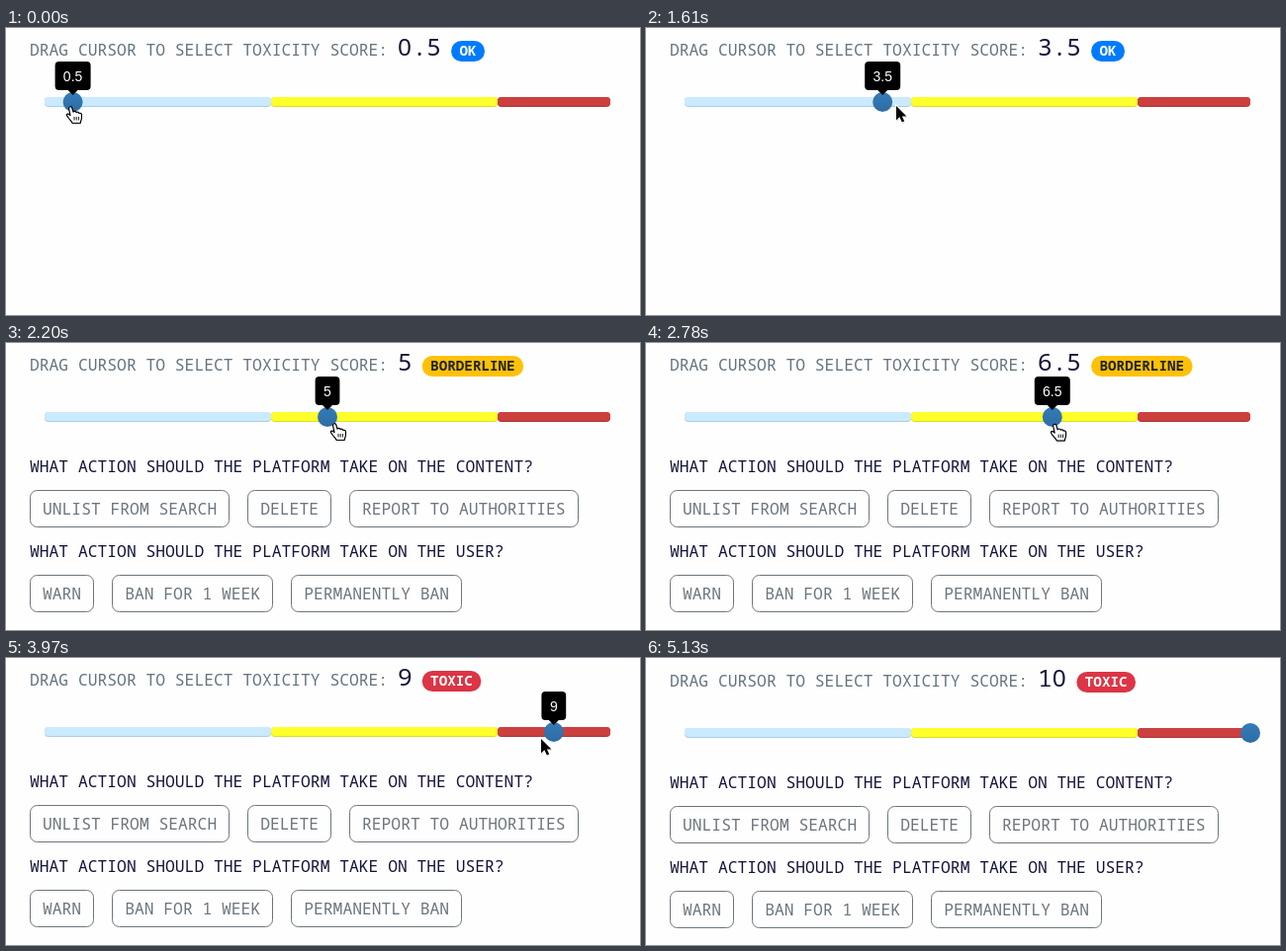
Write an HTML page that moves like this. It is 641 px wide and 291 px high and loops after 5.43 s.

```html
<!DOCTYPE html>
<html lang="en">
<head>
<meta charset="utf-8">
<title>Toxicity score slider</title>
<style>
html, body { margin: 0; width: 100%; height: 100%; overflow: hidden; background: #fefefe; }
svg { display: block; }
text { font: 16.32px "Noto Sans Mono", "DejaVu Sans Mono", monospace; white-space: pre; }
.label { fill: #64747f; }
.head { fill: #14143a; }
.button text { fill: #6c757d; }
.button rect { fill: none; stroke: #6c757d; }
#score { font-size: 24.48px; fill: #14143a; }
.zero { font-family: "Noto Sans", "Open Sans", sans-serif; letter-spacing: .68px; }
#pill text { font-size: 14.28px; font-weight: 700; }
#tip text { font: 14px "Liberation Sans", Arial, sans-serif; fill: #fff; text-anchor: middle; }
</style>
</head>
<body>
<svg width="641" height="291" viewBox="0 0 641 291">
  <defs>
    <linearGradient id="knobFill" x2="0" y2="1">
      <stop offset="0" stop-color="#347bb8"/>
      <stop offset="1" stop-color="#2e6da4"/>
    </linearGradient>
  </defs>
  <g id="page">
    <text class="label" x="24" y="28">DRAG CURSOR TO SELECT TOXICITY SCORE:</text>
    <text id="score" x="396" y="28"></text>
    <g id="pill">
      <rect y="13" height="21" rx="10.5"/>
      <text x="8.4" y="28.3"></text>
    </g>
    <g id="track"></g>
    <g id="panel"></g>
    <circle id="knob" cy="75" r="10" fill="url(#knobFill)"/>
    <g id="tip">
      <rect y="34" height="29" rx="4"/>
      <path d="M-5 63H5L0 68Z"/>
      <text y="54"></text>
    </g>
  </g>
  <g id="cursor">
    <g id="hand" fill="#fff" stroke="#000" stroke-width="1.2" stroke-linejoin="round">
      <path d="M-2.5 1.5C-2.5-.5 .2-1 .8 1L2 5.2C3 4 4.6 4.2 5 5.6C6 4.8 7.4 5.2 7.8 6.5C9.2 5.8 10.5 6.8 10.5 8.5L10.4 11.5C10.4 13 9.4 14 9.2 16.5H1.2C.5 14.8-1 13.5-3 11C-4.2 9.5-5 8.6-4.6 7.6C-4 6.6-2.4 7-1 8.6Z"/>
      <path d="M3 10v3.5M5.2 10v3.5M7.4 10v3.5" stroke-width=".9"/>
    </g>
    <g id="arrow">
      <path d="M.5 1.5V16L3.9 12.8L6.3 18L8.7 17L6.4 11.9H11Z" fill="#000" opacity=".2"/>
      <path d="M0 0V14.5L3.4 11.3L5.8 16.6L8.2 15.5L5.9 10.4H10.5Z" stroke="#fff" stroke-width="2" paint-order="stroke"/>
    </g>
  </g>
</svg>
<script>
const LOOP = 5430, STEP = 146.8;
const LEFT = 39, HALF = 28.6;      // slider start, width of half a point
const CHAR = 9.792, BIG = 14.69, SMALL = 8.57;

// cursor path: step, x, y
const PATH = [
  [0, 66, 80], [6, 160, 82], [11, 253, 79], [15, 333, 82], [22, 475, 83],
  [27, 541, 82], [28, 560, 83], [30, 606, 85], [32, 609, 178]
];
const LEVELS = [
  { from: 8, name: "TOXIC", back: "#dc3545", ink: "#fff" },
  { from: 4, name: "BORDERLINE", back: "#ffc107", ink: "#212529" },
  { from: 0, name: "OK", back: "#007bff", ink: "#fff" }
];

const $ = q => document.querySelector(q);
const show = (el, on) => el.setAttribute("visibility", on ? "visible" : "hidden");
const move = (el, x, y = 0) => el.setAttribute("transform", `translate(${x} ${y})`);

function add(parent, tag, attrs, text) {
  const el = document.createElementNS("http://www.w3.org/2000/svg", tag);
  for (const k in attrs) el.setAttribute(k, attrs[k]);
  if (text) el.textContent = text;
  return parent.appendChild(el);
}

function addTrack(x, width, fill, shade) {
  const bar = { x, y: 70, width, height: 10, rx: 4 };
  add($("#track"), "rect", { ...bar, fill: shade });
  add($("#track"), "rect", { ...bar, height: 9, fill });
}

function addQuestion(y, title, names) {
  const panel = $("#panel");
  add(panel, "text", { class: "head", x: 24, y }, title);
  let x = 24;
  for (const name of names) {
    const width = name.length * CHAR + 26;
    const left = Math.round(x), right = Math.round(x + width);
    const g = add(panel, "g", { class: "button" });
    add(g, "rect", { x: left + .5, y: y + 18.5, width: right - left - 1, height: 37, rx: 7 });
    add(g, "text", { x: x + 13, y: y + 43 }, name);
    x += width + 18;
  }
}

function cursorAt(k) {
  const i = Math.max(1, PATH.findIndex(p => p[0] >= k));
  const [k0, x0, y0] = PATH[i - 1], [k1, x1, y1] = PATH[i];
  const u = (k - k0) / (k1 - k0);
  return [x0 + (x1 - x0) * u, y0 + (y1 - y0) * u];
}

function setScore(value) {
  const label = String(value);
  const level = LEVELS.find(l => value >= l.from);
  $("#score").innerHTML = label.replace("0", '<tspan class="zero">0</tspan>');

  move($("#pill"), 406 + label.length * BIG);
  const [back, name] = $("#pill").children;
  back.setAttribute("width", 16.8 + level.name.length * SMALL);
  back.setAttribute("fill", level.back);
  name.setAttribute("fill", level.ink);
  name.textContent = level.name;
  show($("#panel"), value >= 4);

  const x = LEFT + value * 2 * HALF;
  $("#knob").setAttribute("cx", x);
  move($("#tip"), x);
  const width = label.includes(".") ? 36 : label.length * 7.8 + 17;
  const box = $("#tip rect");
  box.setAttribute("x", -width / 2);
  box.setAttribute("width", width);
  $("#tip text").textContent = label;
  return x;
}

function draw(t) {
  const k = Math.floor((t + 10) / STEP);
  const [x, y] = cursorAt(Math.min(k, 32));
  const value = Math.min(20, Math.round((x - LEFT) / HALF)) / 2;
  const knob = setScore(value);
  const over = Math.abs(x - knob) < 10 && y < 90;
  move($("#cursor"), x, y);
  show($("#hand"), k <= 32 && over);
  show($("#arrow"), k <= 32 && !over);
  show($("#tip"), k <= 30);
  move($("#page"), 0, k >= 35 ? 1 : 0);
}

addTrack(LEFT, 229, "#cbeaff", "#a9cee4");
addTrack(268, 229, "#ffff2b", "#dcdc20");
addTrack(497, 114, "#cb403f", "#a93232");
addQuestion(131, "WHAT ACTION SHOULD THE PLATFORM TAKE ON THE CONTENT?",
  ["UNLIST FROM SEARCH", "DELETE", "REPORT TO AUTHORITIES"]);
addQuestion(217, "WHAT ACTION SHOULD THE PLATFORM TAKE ON THE USER?",
  ["WARN", "BAN FOR 1 WEEK", "PERMANENTLY BAN"]);

const start = performance.now();
function tick() {
  draw((performance.now() - start) % LOOP);
  requestAnimationFrame(tick);
}
tick();
</script>
</body>
</html>
```
